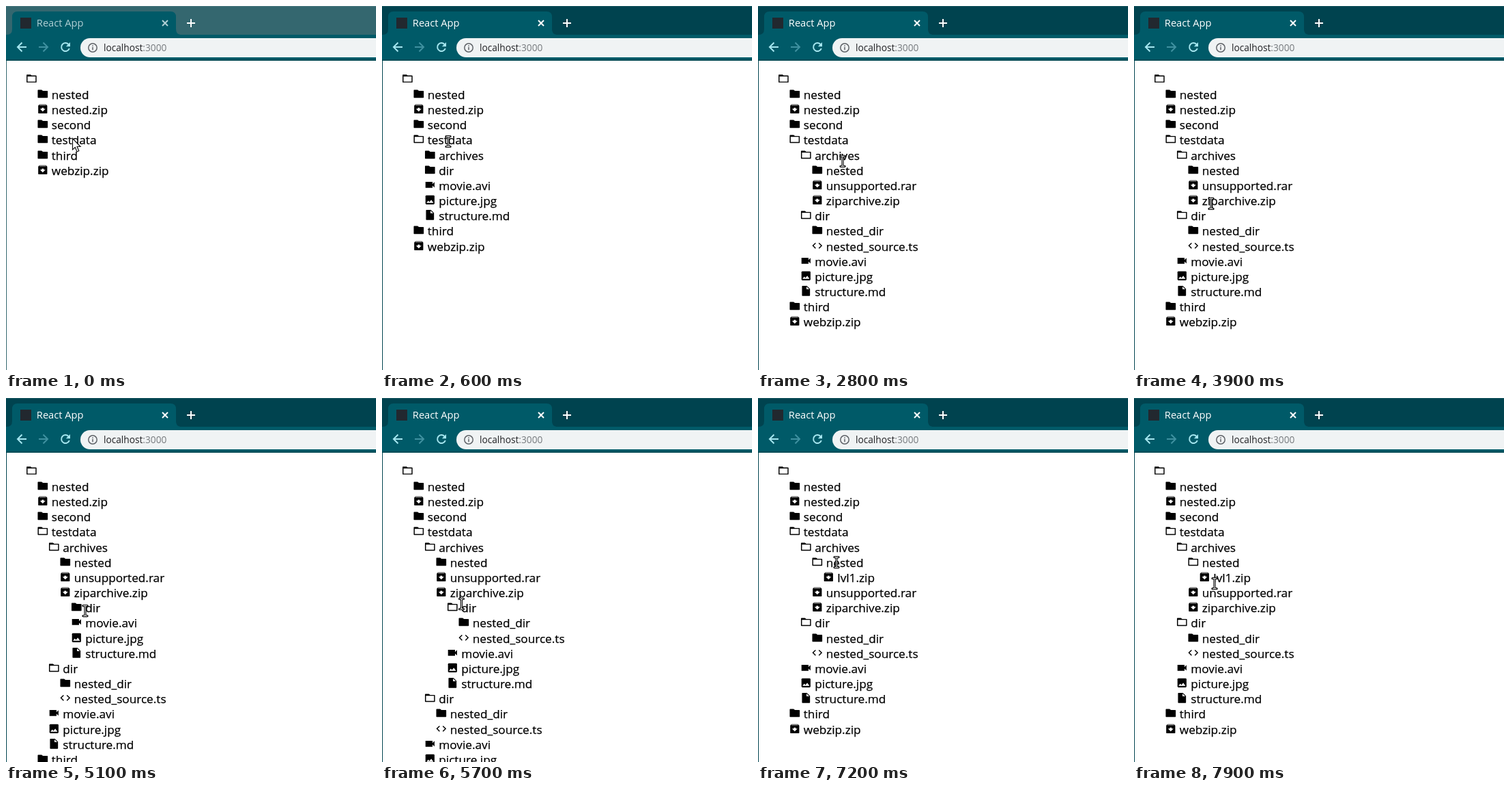
Recreate the animation shown at these times as an HTML page. Size 542 px wide and 532 px high, loop 8 s.

```html
<!DOCTYPE html>
<html lang="en">
<head>
<meta charset="utf-8">
<title>File tree</title>
<style>
  html, body { margin: 0; width: 100%; height: 100%; overflow: hidden; background: #fff; }
  svg { display: block; }
  text { font-family: "Open Sans", "Noto Sans", sans-serif; white-space: pre; }
  #tree text { font-size: 17.2px; stroke: #000; stroke-width: .25px; }
  .line { fill: none; stroke-width: 2; }
  .ink { stroke: #000; stroke-width: 2; stroke-linejoin: round; }
  .hole { fill: #fff; }
  .light { stroke: #a5e6ef; }
</style>
</head>
<body>
<svg width="542" height="532" viewBox="0 0 542 532">
  <defs>
    <path id="folder" class="ink" d="M3 5h6.6l2 2H21v12H3z"/>
    <path id="opened" class="ink" fill="none" d="M3 5h6.6l2 2H21v12H3zM3 7h9"/>
    <g id="archive">
      <path class="ink" d="M4 6l2-2h12l2 2v14H4z"/>
      <path class="hole" d="M12 17.5L6.5 12H10v-2h4v2h3.5zM5.5 4h13v1h-13z"/>
    </g>
    <path id="video" d="M3 6h14v4.5l4-4v11l-4-4V18H3z"/>
    <g id="image">
      <rect x="3" y="3" width="18" height="18" rx="2"/>
      <path class="hole" d="M5 18l3.5-4.5 2.5 3 3.5-4.5 4.5 6z"/>
    </g>
    <g id="file">
      <path class="ink" d="M5 3h8.5L19 8.5V21H5z"/>
      <path class="hole" d="M13 3.5V9h5.5z"/>
    </g>
    <path id="code" class="line" stroke="#000" d="M8.7 6.7L3.4 12l5.3 5.3M15.3 6.7l5.3 5.3-5.3 5.3"/>
    <path id="stem" fill="none" d="M-3 -7.5h6M-3 7.5h6M0 -7.5v15"/>
  </defs>

  <rect id="frame" width="542" height="42"/>
  <rect id="edge" y="80" width="1" height="452"/>
  <rect width="542" height="1" fill="#fff" opacity=".12"/>
  <g fill="#005a68">
    <rect y="42" width="542" height="38"/>
    <path d="M1 42q8 0 8-8V16q0-8 8-8h224q8 0 8 8v18q0 8 8 8z"/>
  </g>
  <rect y="78.5" width="542" height="1.5" fill="#004650"/>
  <rect x="21" y="17" width="16" height="16" fill="#22282f"/>
  <text id="title" x="44.8" y="30" font-size="14.7">React App</text>
  <path id="close" class="line" d="M229 21l8 8m0-8l-8 8"/>
  <path class="line" stroke="#fff" d="M265 25h12m-6-6v12"/>

  <path class="line light" d="M30 60H17m6.5-6.5L17 60l6.5 6.5"/>
  <path class="line" stroke="#3f91a0" d="M48 60h13m-6.5-6.5L61 60l-6.5 6.5"/>
  <path class="line light" d="M91.5 56a6 6 0 1 0 1.3 6"/>
  <path fill="#a5e6ef" d="M94 53v6.2h-6.2z"/>
  <rect x="109" y="47" width="460" height="28" rx="14" fill="#f0f3f4"/>
  <g stroke="#5f6368" stroke-width="1.5" fill="none">
    <circle cx="127" cy="61" r="6.2"/>
    <path d="M127 60v4.2m0-6.8v1.6"/>
  </g>
  <text x="143" y="66" font-size="13.7" fill="#202124">localhost<tspan fill="#75797d">:3000</tspan></text>

  <g id="tree"></g>
  <path id="arrow" transform="translate(97.5 193.5)" fill="#fff" stroke="#111" stroke-width="1.2"
        d="M0 0v16.5l3.8-3.5 2.7 6.5 2.8-1.2L6.6 12h4.9z"/>
  <g id="beam">
    <use href="#stem" stroke="#000" stroke-width="3.2" stroke-linecap="round"/>
    <use href="#stem" stroke="#fff" stroke-width="1"/>
  </g>
</svg>
<script>
const LOOP = 8000, STEP = 100, TRAVEL = 400;
const ROW = 133 / 6, INDENT = 16.5;
const $ = id => document.getElementById(id);

// A node is open between its two times; archives keep their icon.
const node = (name, icon, children = [], from = Infinity, to = Infinity) =>
  ({ name, icon, children, from, to });
const dir = (name, ...rest) => node(name, 'folder', ...rest);
const zip = (name, ...rest) => node(name, 'archive', ...rest);
const media = () => [
  node('movie.avi', 'video'),
  node('picture.jpg', 'image'),
  node('structure.md', 'file')
];
const sources = () => [dir('nested_dir'), node('nested_source.ts', 'code')];

const roots = [
  dir('nested'),
  zip('nested.zip'),
  dir('second'),
  dir('testdata', [
    dir('archives', [
      dir('nested', [zip('lvl1.zip')], 7000),
      zip('unsupported.rar'),
      zip('ziparchive.zip', [dir('dir', sources(), 5500), ...media()], 4300, 6600)
    ], 2800),
    dir('dir', sources(), 2200),
    ...media()
  ], 400),
  dir('third'),
  zip('webzip.zip')
];

// Pointer visits: time of arrival, tree row, x
const visits = [
  [0, 3, 97], [1300, 6.7, 100], [2000, 5, 105], [2600, 4.3, 124],
  [3200, 5.2, 119], [3900, 7.1, 113], [4700, 8.1, 121], [5100, 8.1, 116],
  [6000, 5.2, 119], [6400, 7, 111], [6800, 4.9, 115], [7700, 6.4, 121], [7900, 6.3, 118]
];

const mix = (a, b, k) => a + (b - a) * k;
const clamp = k => Math.min(1, Math.max(0, k));
const smooth = k => k * k * (3 - 2 * k);

function pointerAt(t) {
  let [, row, x] = visits[0];
  for (const [arrival, nextRow, nextX] of visits) {
    const k = smooth(clamp((t - arrival) / TRAVEL + 1));
    if (!arrival) continue;
    row = mix(row, nextRow, k);
    x = mix(x, nextX, k);
  }
  return [x, 131.5 + ROW * row];
}

const icon = (id, x, y) =>
  `<use href="#${id}" transform="translate(${x - 8.8} ${y - 8.8}) scale(.7333)"/>`;

function treeMarkup(t) {
  let row = 0, markup = icon('opened', 37.4, 106);
  const add = (nodes, level) => nodes.forEach(n => {
    const open = t >= n.from && t < n.to;
    const x = INDENT * level, y = Math.round(ROW * row++ - .01);
    markup += icon(open && n.icon === 'folder' ? 'opened' : n.icon, 53.8 + x, 128.3 + y) +
      `<text x="${66.8 + x}" y="${136 + y}">${n.name}</text>`;
    if (open) add(n.children, level + 1);
  });
  add(roots, 0);
  return markup;
}

const blend = (from, to, k) => `rgb(${from.map((c, i) => Math.round(mix(c, to[i], k)))})`;

let shown = '';
function draw(t) {
  const focus = clamp((t - 200) / 400);
  const frame = blend([52, 103, 111], [0, 67, 79], focus);
  const label = blend([176, 207, 212], [255, 255, 255], focus);
  $('frame').setAttribute('fill', frame);
  $('edge').setAttribute('fill', frame);
  $('title').setAttribute('fill', label);
  $('close').setAttribute('stroke', label);

  const markup = treeMarkup(t);
  if (markup !== shown) $('tree').innerHTML = shown = markup;

  const overText = t >= 100;
  $('arrow').style.display = overText ? 'none' : '';
  $('beam').style.display = overText ? '' : 'none';
  $('beam').setAttribute('transform', `translate(${pointerAt(t)})`);
}

const start = performance.now();
function tick() {
  const t = (performance.now() - start) % LOOP;
  draw(Math.floor(t / STEP) * STEP);
  requestAnimationFrame(tick);
}
tick();
</script>
</body>
</html>
```
